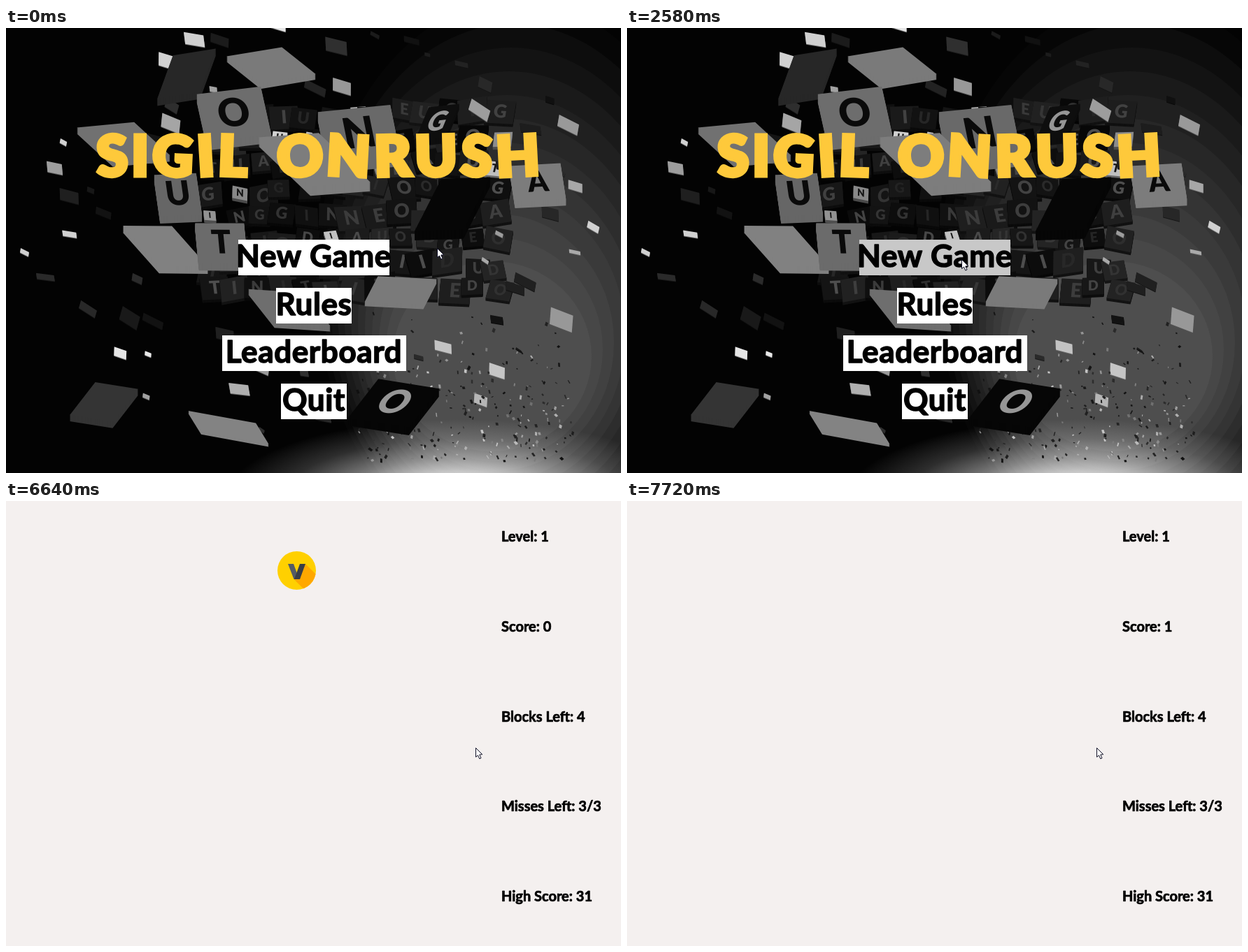
An HTML page with a canvas for the animation above (8 s loop, 879 by 637 pixels).

```html
<!DOCTYPE html>
<html lang="en">
<head>
<meta charset="utf-8">
<title>Sigil Onrush</title>
<style>
html, body { margin: 0; width: 100%; height: 100%; overflow: hidden; background: #000; }
canvas { display: block; width: 879px; height: 637px; }
</style>
</head>
<body>
<canvas id="stage" width="879" height="637"></canvas>
<script>
const W = 879, H = 637, LOOP = 8000;
const stage = document.getElementById('stage').getContext('2d');
const FACE = 'Lato, "Open Sans", sans-serif';
const grey = v => `rgb(${v},${v},${v})`;

function seeded(seed) {
  return () => (seed = (seed * 16807) % 2147483647) / 2147483647;
}

// Large tiles: centre, width, height, tone, letter.
const slabs = [
  [258, 65, 62, 58, 70],
  [379, 53, 80, 46, 222],
  [168, 162, 82, 52, 205],
  [326, 123, 92, 70, 198, 'O'],
  [505, 152, 104, 76, 190, 'N'],
  [616, 135, 44, 46, 25, 'G'],
  [441, 188, 86, 76, 228],
  [246, 238, 60, 60, 185, 'U'],
  [760, 221, 73, 52, 226, 'A'],
  [638, 252, 70, 74, 10],
  [228, 312, 70, 58, 235],
  [308, 308, 70, 58, 195, 'T'],
  [564, 375, 84, 38, 222],
  [405, 400, 80, 45, 200],
  [140, 535, 62, 52, 95],
  [318, 571, 98, 26, 238],
  [554, 537, 88, 62, 10, 'O']
];

// Backdrop: letter tiles bursting out of a dark wall, painted once.
function paintBackdrop() {
  const cv = document.createElement('canvas');
  cv.width = W;
  cv.height = H;
  const c = cv.getContext('2d');
  const rnd = seeded(4711);
  const span = (a, b) => a + (b - a) * rnd();

  function tile(x, y, w, h, turn, lean, tone, depth = 0, glyph = '', ink = 15) {
    c.save();
    for (let d = depth; d >= 0; d--) {
      c.setTransform(1, 0, 0, 1, x, y + d);
      c.rotate(turn);
      c.transform(1, 0, lean, 1, 0, 0);
      c.fillStyle = grey(d ? tone * .55 : tone);
      c.fillRect(-w / 2, -h / 2, w, h);
    }
    if (glyph) {
      c.font = `900 ${h * .8}px ${FACE}`;
      c.textAlign = 'center';
      c.textBaseline = 'middle';
      c.fillStyle = grey(ink);
      c.fillText(glyph, 0, 0);
    }
    c.restore();
  }

  // Haze in stepped tones on the right.
  c.fillStyle = '#030303';
  c.fillRect(0, 0, W, H);
  for (let i = 0; i < 12; i++) {
    c.fillStyle = grey(6 + i * 6.5);
    c.beginPath();
    c.ellipse(728 - i * 3, 360 + i * 10, 285 - i * 13, 400 - i * 24, 0, 0, Math.PI * 2);
    c.fill();
  }

  // Light on the floor.
  c.save();
  c.translate(645, 672);
  c.scale(330, 112);
  const g = c.createRadialGradient(0, 0, 0, 0, 0, 1);
  [1, .9, .5, .18, 0].forEach((a, i) => g.addColorStop(i / 4, `rgba(240,240,240,${a})`));
  c.fillStyle = g;
  c.fillRect(-1, -1, 2, 2);
  c.restore();

  // Wall of dark keys with a few bright ones.
  for (let y = 125; y < 385; y += 36) {
    for (let x = 295; x < 715; x += 34) {
      const lit = rnd() < .1, tone = lit ? span(120, 215) : span(6, 38);
      const size = lit ? span(16, 30) : span(30, 44);
      const glyph = 'ODIGNAUTE'[Math.floor(rnd() * 9)];
      tile(x + span(-8, 8), y + span(-8, 8), size, size * .8, span(-.2, .2), span(-.2, .2), tone, 4, glyph, lit ? 20 : span(35, 80));
    }
  }

  // Chips thrown outwards in a ring.
  for (let i = 0; i < 64; i++) {
    const a = i * 2.4, r = span(.75, 1.3);
    const x = 440 + Math.cos(a) * 330 * r, y = 285 + Math.sin(a) * 235 * r;
    const size = span(8, 34), tone = rnd() < .4 ? span(150, 235) : span(15, 50);
    tile(x, y, size, size * span(.3, .7), span(.1, .6), .3, tone, 1);
  }

  // Fine debris, denser towards the floor.
  for (let i = 0; i < 280; i++) {
    const x = span(500, 810), y = 395 + Math.sqrt(rnd()) * 225;
    tile(x, y, span(1, 4), span(1, 6), span(-.8, .8), .2, rnd() < .6 ? span(15, 45) : span(110, 200));
  }

  for (const [x, y, w, h, tone, glyph] of slabs) {
    const dark = tone < 100;
    const lean = dark ? -.55 : glyph ? .1 : x > 480 ? -.45 : .9;
    tile(x, y, w, h, (y - 300) / 1500, lean, tone, h * .18, glyph, dark ? 150 : 10);
  }
  return cv;
}

const backdrop = paintBackdrop();

function label(text, x, y, size, color, align = 'left') {
  const c = stage;
  c.font = `bold ${size}px ${FACE}`;
  c.textAlign = align;
  c.textBaseline = 'alphabetic';
  c.lineJoin = 'round';
  c.lineWidth = size * .035;
  c.fillStyle = c.strokeStyle = color;
  c.fillText(text, x, y);
  c.strokeText(text, x, y);
}

// Chunky lettering with a slight tilt on each letter.
function title(base) {
  const c = stage, text = [...'SIGIL ONRUSH'];
  c.font = `900 81px ${FACE}`;
  c.textAlign = 'center';
  c.textBaseline = 'alphabetic';
  c.lineJoin = 'miter';
  c.lineWidth = 5;
  c.fillStyle = c.strokeStyle = '#fec93b';
  const widths = text.map(s => c.measureText(s).width + (s === ' ' ? 18 : 5));
  let x = 446 - widths.reduce((a, b) => a + b) / 2;
  text.forEach((s, i) => {
    c.save();
    c.translate(x + widths[i] / 2, base - 31);
    c.rotate(Math.sin(i * 2.3 + 4) * .06);
    c.fillText(s, 0, 29);
    c.strokeText(s, 0, 29);
    c.restore();
    x += widths[i];
  });
}

// Pointer stops: time, x, y.
const path = [
  [0, 616, 315], [610, 616, 315], [960, 568, 295], [1450, 568, 295],
  [1550, 600, 279], [1700, 660, 303], [1790, 642, 346], [1900, 605, 332],
  [2060, 543, 299], [2250, 556, 318], [2580, 478, 331],
  [2880, 478, 331], [3210, 671, 353], [LOOP, 671, 353]
];

function pointer(t) {
  const i = path.findIndex(p => p[0] > t);
  const [t0, x0, y0] = path[i - 1], [t1, x1, y1] = path[i];
  const k = (t - t0) / (t1 - t0);
  return [Math.round(x0 + (x1 - x0) * k), Math.round(y0 + (y1 - y0) * k)];
}

const arrow = new Path2D('M0 0V13L3 10.5L5.3 15.5L7.5 14.5L5.3 9.5L9.3 9.3Z');

function drawPointer(x, y) {
  const c = stage;
  c.save();
  c.translate(x + .5, y + .5);
  c.fillStyle = '#fff';
  c.fill(arrow);
  c.lineJoin = 'round';
  c.lineWidth = 1;
  c.strokeStyle = '#101026';
  c.stroke(arrow);
  c.restore();
}

const menu = [['New Game', 216], ['Rules', 108], ['Leaderboard', 263], ['Quit', 94]];

function drawMenu(px, py) {
  stage.drawImage(backdrop, 0, 0);
  title(214);
  stage.letterSpacing = '0.6px';
  menu.forEach(([text, w], i) => {
    const x = Math.round(440 - w / 2), y = Math.round(303 + i * 68.6), h = 51;
    const over = px >= x && px < x + w && py >= y && py < y + h;
    stage.fillStyle = over ? '#c8c8c8' : '#fff';
    stage.fillRect(x, y, w, h);
    label(text, 440, y + 39, 44, '#000', 'center');
  });
  stage.letterSpacing = '0px';
}

function drawLoading() {
  stage.fillStyle = '#0b2447';
  stage.fillRect(0, 0, W, H);
  title(283);
  label('Loading Level 1 ...', 310, 352, 30.5, '#fff');
}

const shade = new Path2D('M12.5 -9.5l30 30L26 42.5L-4 12.5Z');
const armLeft = new Path2D('M-12.5 -9.5h8L3.5 12.5H-4Z');
const armRight = new Path2D('M4.5 -9.5h8L4.5 12.5h-8Z');

function drawBlock(x, y) {
  const c = stage;
  const paint = (color, shape) => {
    c.fillStyle = color;
    c.fill(shape);
  };
  const disc = new Path2D();
  disc.arc(0, 0, 27.5, 0, Math.PI * 2);
  c.save();
  c.translate(x, y);
  paint('#ffd000', disc);
  c.clip(disc);
  paint('#ffa800', shade);
  paint('#545b65', armLeft);
  paint('#393d46', armRight);
  c.restore();
}

function drawGame(t) {
  stage.fillStyle = '#f4f0ef';
  stage.fillRect(0, 0, W, H);
  const hit = t >= 7720;
  const lines = ['Level: 1', `Score: ${hit ? 1 : 0}`, 'Blocks Left: 4', 'Misses Left: 3/3', 'High Score: 31'];
  lines.forEach((s, i) => label(s, 708, 58 + i * 128.8, 20, '#000'));
  if (!hit) drawBlock(415.5, 99.5 + Math.round((t - 6640) * .11));
}

function frame(now) {
  const t = now % LOOP, [px, py] = pointer(t);
  if (t < 2700) drawMenu(px, py);
  else if (t < 6640) drawLoading();
  else drawGame(t);
  drawPointer(px, py);
}

const start = performance.now();
(function tick() {
  frame(performance.now() - start);
  requestAnimationFrame(tick);
})();
</script>
</body>
</html>
```
